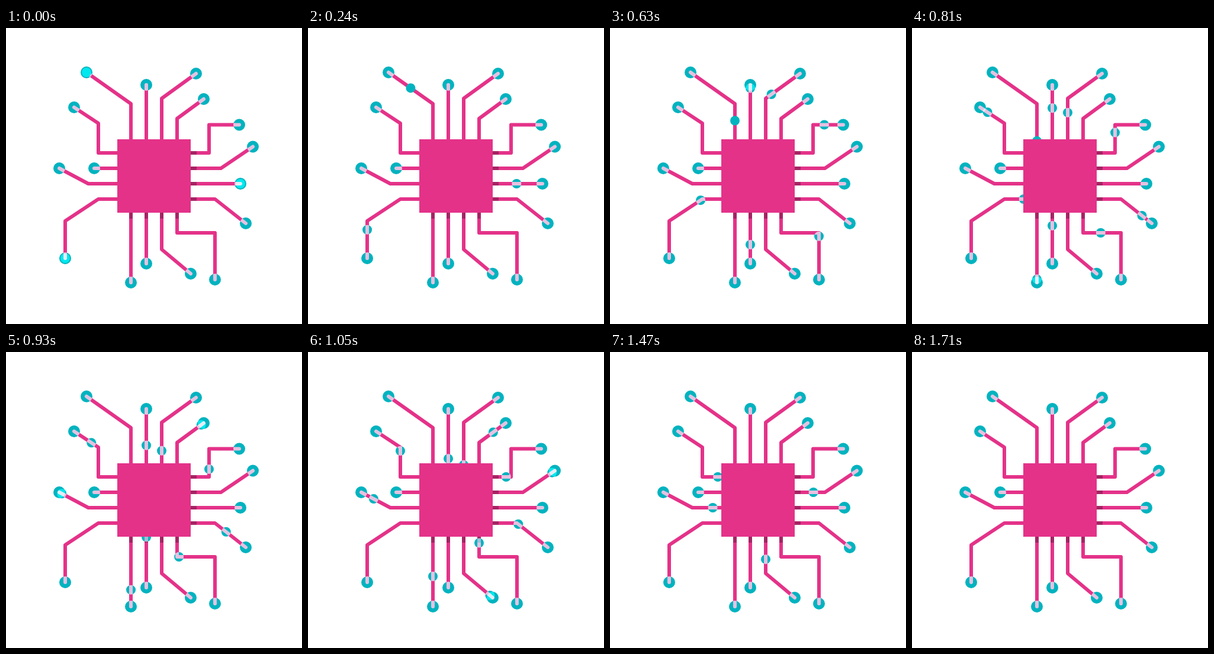
Recreate the animation shown at these times as an HTML page with a canvas. Size 500 by 500 pixels, loop 2700 ms.

```html
<!DOCTYPE html>
<html lang="en">
<head>
<meta charset="utf-8">
<title>Chip with signals</title>
<style>
  html, body { margin: 0; width: 100%; height: 100%; overflow: hidden; background: #fff; }
  canvas { display: block; }
</style>
</head>
<body>
<canvas id="stage" width="500" height="500"></canvas>
<script>
const ctx = document.getElementById('stage').getContext('2d');
const PINK = '#e43289', TEAL = '#00b3bf';
const LOOP = 2700, STEP = 30;

// Points run from the node into the chip; start in ms, speed in px per ms.
const wires = [
  { pts: [[136, 75], [211, 128], [211, 204]], start: 0, speed: .191 },
  { pts: [[396, 263], [296, 263]], start: 0, speed: .182 },
  { pts: [[100, 389], [100, 326], [156, 289], [204, 289]], start: 0, speed: .201 },
  { pts: [[353, 425], [353, 346], [289, 346], [289, 296]], start: 300, speed: .222 },
  { pts: [[321, 77], [263, 119], [263, 204]], start: 330, speed: .199 },
  { pts: [[237, 398], [237, 296]], start: 450, speed: .178 },
  { pts: [[394, 163.5], [343, 163.5], [343, 211], [296, 211]], start: 450, speed: .178 },
  { pts: [[237, 96], [237, 204]], start: 600, speed: .187 },
  { pts: [[405, 330], [353, 289], [296, 289]], start: 690, speed: .176 },
  { pts: [[115, 134], [156, 161], [156, 211], [204, 211]], start: 720, speed: .167 },
  { pts: [[211, 430], [211, 296]], start: 780, speed: .189 },
  { pts: [[334, 120], [289, 153], [289, 204]], start: 900, speed: .175 },
  { pts: [[90, 237], [139, 263], [204, 263]], start: 900, speed: .158 },
  { pts: [[417, 200.5], [363, 237], [296, 237]], start: 1020, speed: .188 },
  { pts: [[312, 415], [263, 374], [263, 296]], start: 1020, speed: .195 },
  { pts: [[149, 237], [204, 237]], start: Infinity, speed: 0 }
];

function dot([x, y], r) {
  ctx.beginPath();
  ctx.arc(x, y, r, 0, 2 * Math.PI);
  ctx.fill();
}

// Point at distance d along a polyline, or null beyond its end.
function pointAt(pts, d) {
  for (let i = 1; i < pts.length; i++) {
    const [x, y] = pts[i - 1], dx = pts[i][0] - x, dy = pts[i][1] - y;
    const len = Math.hypot(dx, dy);
    if (d <= len) return [x + dx * d / len, y + dy * d / len];
    d -= len;
  }
  return null;
}

function drawPulse({ pts, start, speed }, t) {
  const p = t >= start && pointAt(pts, (t - start) * speed);
  if (p) dot(p, 8);
}

function draw(t) {
  ctx.globalCompositeOperation = 'source-over';
  ctx.clearRect(0, 0, 500, 500);
  ctx.strokeStyle = PINK;
  ctx.lineWidth = 6;
  ctx.lineCap = ctx.lineJoin = 'round';
  ctx.beginPath();
  for (const { pts } of wires) pts.forEach(([x, y], i) => i ? ctx.lineTo(x, y) : ctx.moveTo(x, y));
  ctx.stroke();

  // The chip's shadow shows only on the wires.
  ctx.globalCompositeOperation = 'source-atop';
  ctx.fillStyle = 'rgba(0, 0, 0, .28)';
  ctx.fillRect(198, 198, 124, 124);

  // The first pulse covers its wire; everything else is screened.
  ctx.globalCompositeOperation = 'source-over';
  ctx.fillStyle = TEAL;
  drawPulse(wires[0], t);
  ctx.globalCompositeOperation = 'screen';
  for (const { pts } of wires) dot(pts[0], 10);
  for (const wire of wires.slice(1)) drawPulse(wire, t);

  ctx.globalCompositeOperation = 'source-over';
  ctx.fillStyle = PINK;
  ctx.fillRect(188, 188, 124, 124);
}

function tick() {
  draw(Math.floor(performance.now() % LOOP / STEP) * STEP);
  requestAnimationFrame(tick);
}
tick();
</script>
</body>
</html>
```
